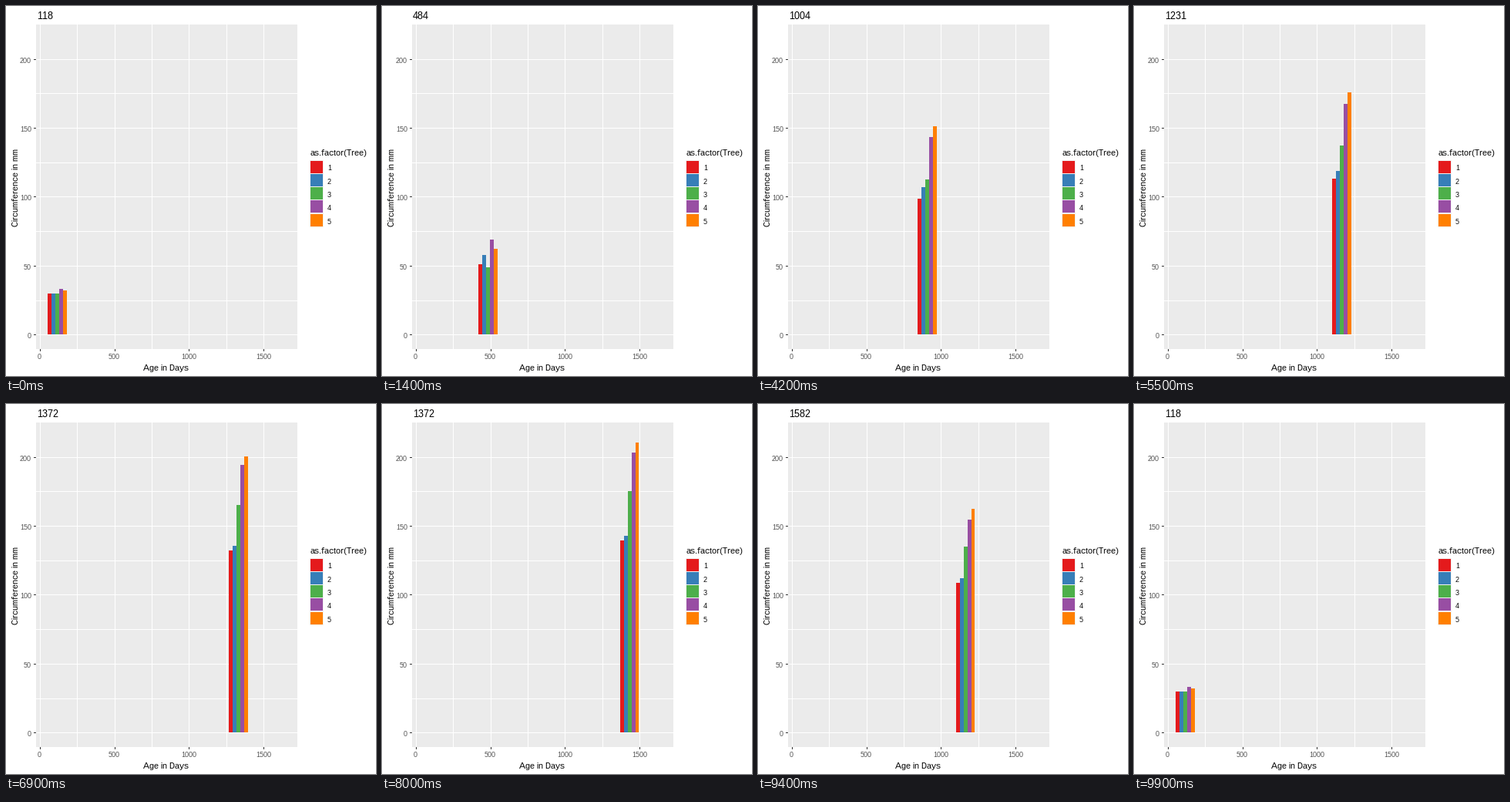
These frames come from a looping animation (480 by 480 pixels, 10 s). A matplotlib script:

```python
import matplotlib.pyplot as plt
import numpy as np
from matplotlib.animation import FuncAnimation
from matplotlib.patches import Rectangle

SIZE, DPI = 480, 72
FRAMES, STEPS = 100, 7
LEFT, RIGHT, TOP, BOTTOM = 39, 378, 24, 445
COLORS = ["#E41A1C", "#377EB8", "#4DAF4A", "#984EA3", "#FF7F00"]

AGES = np.array([118, 484, 664, 1004, 1231, 1372, 1582])
GIRTHS = np.array([
    [30, 51, 75, 108, 115, 139, 140],
    [30, 58, 87, 115, 120, 142, 145],
    [30, 49, 81, 125, 142, 174, 177],
    [33, 69, 111, 156, 172, 203, 203],
    [32, 62, 112, 167, 179, 209, 214],
]).T
STARTS = [8, 23, 38, 51, 65, 79, 93]  # first step of each transition
BAR = 0.9 * 141 / 5

plt.rcParams.update({
    "font.family": "Liberation Sans",
    "text.hinting": "native",
    "text.hinting_factor": 1,
    "text.kerning_factor": 6,
})

fig = plt.figure(figsize=(SIZE / DPI, SIZE / DPI), dpi=DPI, facecolor="white")
ax = fig.add_axes([0, 0, 1, 1])
ax.set_xlim(0, SIZE)
ax.set_ylim(SIZE, 0)
ax.axis("off")


def px(age):
    return LEFT + (age + 25.04) * (RIGHT - LEFT) / 1750.6


def py(girth):
    return 426.3 - girth * 1.7889


def box(x0, y0, x1, y1, color):
    return ax.add_patch(Rectangle((x0, y0), x1 - x0, y1 - y0, facecolor=color,
                                  linewidth=0, antialiased=False))


def label(x, y, text, size, color="black", **kw):
    return ax.text(x, y, text, fontsize=size, color=color, **kw)


def draw_panel():
    box(LEFT, TOP, RIGHT, BOTTOM, "#EBEBEB")
    for girth in range(0, 201, 25):
        y = round(py(girth))
        box(LEFT, y, RIGHT, y + 1, "white")
        if girth % 50 == 0:
            box(LEFT - 3, y, LEFT, y + 1, "#333333")
            label(33, y + 5, str(girth), 9, "#4D4D4D", ha="right")
    for age in range(0, 1501, 250):
        x = round(px(age))
        box(x, TOP, x + 1, BOTTOM, "white")
        if age % 500 == 0:
            box(x, BOTTOM, x + 1, BOTTOM + 3, "#333333")
            label(px(age) - 0.5, 458, str(age), 9, "#4D4D4D", ha="center")
    label(208, 473, "Age in Days", 11, ha="center")
    label(13, 235, "Circumference in mm", 11, rotation=90,
          ha="center", va="center")


def draw_legend():
    label(395, 194, "as.factor(Tree)", 11)
    box(394, 200, 412, 287, "#F2F2F2")
    for i, color in enumerate(COLORS):
        y = 200.6 + 17.28 * i
        box(395, round(y), 411, round(y + 16), color)
        label(417, round(y + 12.8), str(i + 1), 9)


draw_panel()
draw_legend()
bars = [box(0, 0, 1, 1, c) for c in COLORS]
title = label(40, 17, "", 13)


def pose(frame):
    """Return the states moved between and the share of the way done."""
    state, part = 0, 1.0
    for i, start in enumerate(STARTS):
        if frame >= start:
            state = i + 1
            part = min((frame - start + 1) / STEPS, 1.0)
    n = len(AGES)
    return (state - 1) % n, state % n, part


def update(frame):
    a, b, part = pose(frame)
    age = AGES[a] + (AGES[b] - AGES[a]) * part
    girths = GIRTHS[a] + (GIRTHS[b] - GIRTHS[a]) * part
    for i, (bar, girth) in enumerate(zip(bars, girths)):
        x0 = round(px(age + (i - 2.5) * BAR))
        x1 = round(px(age + (i - 1.5) * BAR))
        y = round(py(girth))
        bar.set_bounds(x0, y, x1 - x0, round(py(0)) - y)
    title.set_text(str(AGES[b if part > 0.5 else a]))
    return [*bars, title]


anim = FuncAnimation(fig, update, frames=FRAMES, interval=100,
                     repeat=True, repeat_delay=0, blit=False)
plt.show()
```
